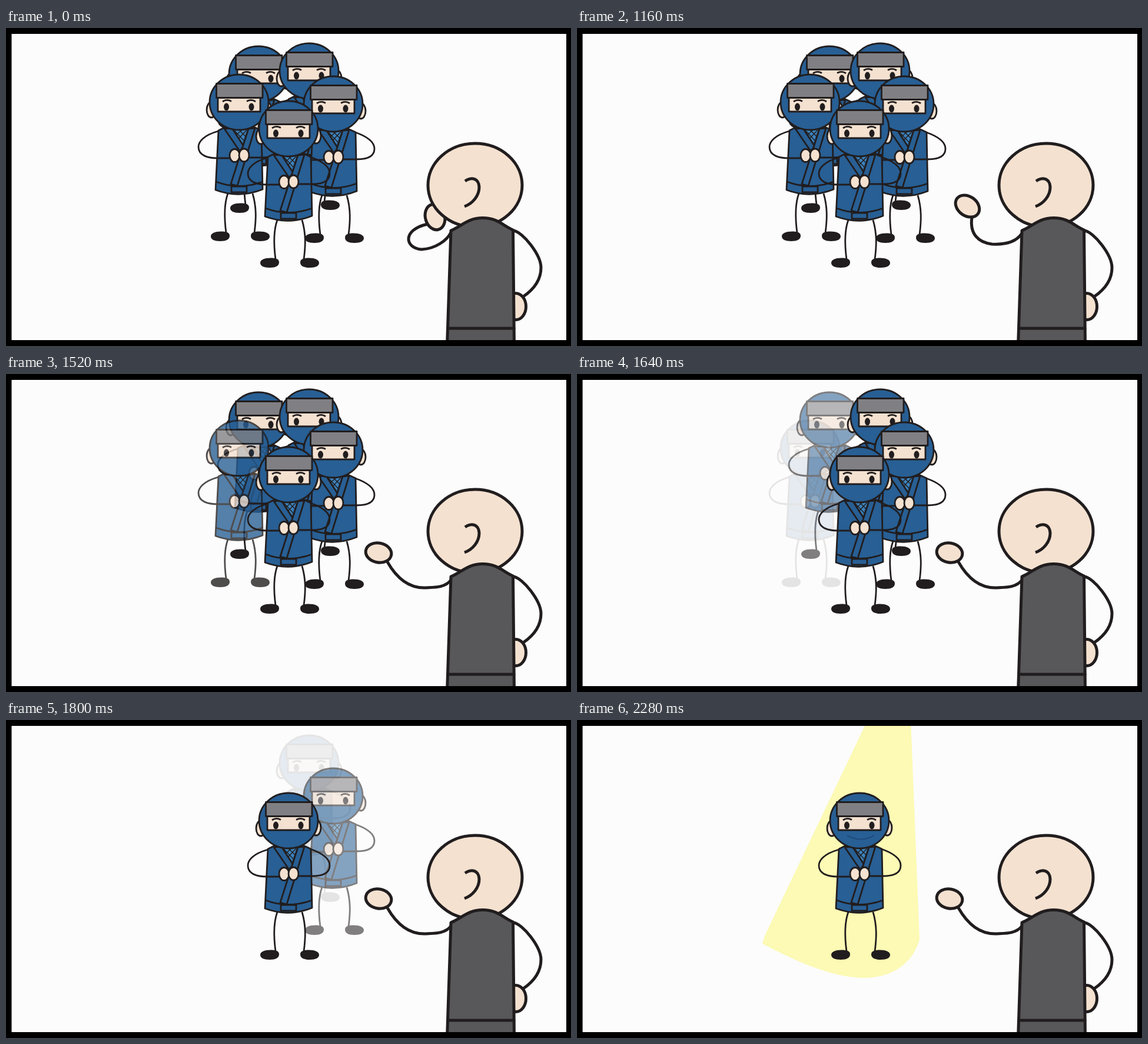
Animation of 960 by 540 pixels, one loop 3400 ms. Source, as an HTML page:

```html
<!DOCTYPE html>
<html lang="en">
<head>
<meta charset="utf-8">
<title>The chosen one</title>
<style>
  html, body { margin: 0; height: 100%; overflow: hidden; background: #fcfcfc; }
  svg { display: block; width: 100vw; height: 100vh; }
  .line { fill: none; }
  .skin { fill: #f4e1d0; }
  .cloth { fill: #285f94; }
  .grey { fill: #808084; }
  .ink { fill: #211d1e; stroke: none; }
  .suit { fill: #58585a; }
</style>
</head>
<body>
<svg viewBox="0 0 960 540">
  <defs>
    <g id="ninja" stroke="#211d1e" stroke-width="2.8" stroke-linejoin="round">
      <path class="line" d="M461 326C454 345 455 370 458 393M503 326C510 350 509 370 506 393"/>
      <path class="ink" d="M432 399C432 393 440 390 452 390.500C460 391 464 393 464 398C464 404 458 407 448 407C438 407 432 404 432 399Z
        M532 399C532 393 524 390 512 390.500C504 391 500 393 500 398C500 404 506 407 516 407C526 407 532 404 532 399Z"/>
      <path class="cloth" d="M445 219L457 213H505L518 219L520 319Q480 335 440 320Z"/>
      <path d="M470 215H495L484 243Z" fill="#3d83bd" stroke="none"/>
      <path class="line" stroke-width="1.500" d="M472 219L488 236M479 217L491 229M493 218L479 233M486 217L475 227"/>
      <path class="cloth" d="M455 216L481 254L488 246L468 215Z"/>
      <path class="cloth" d="M496 216L466 310L477 313L507 215Z"/>
      <path class="line" d="M441 306Q480 321 520 306"/>
      <path class="cloth" d="M467 314H493V324H467Z"/>
      <path class="line" d="M445 220C420 227 411 238 411 247C411 262 428 266 443 266H465M517 219C540 227 550 237 550 247C550 260 538 265 520 265H496"/>
      <ellipse class="skin" cx="472.500" cy="261.500" rx="8.500" ry="11"/>
      <ellipse class="skin" cx="488.500" cy="261" rx="8.500" ry="11"/>
      <ellipse class="skin" cx="433" cy="184" rx="8" ry="13"/>
      <ellipse class="skin" cx="527" cy="183" rx="8" ry="13"/>
      <ellipse class="cloth" cx="480" cy="171" rx="50" ry="47"/>
      <path class="skin" d="M444 163H516V187H444Z"/>
      <path class="grey" d="M441.500 139.500H520V163.500H441.500Z"/>
      <path class="line" d="M452 170Q459 165 467 169.500M493 169.500Q501 165 508 170"/>
      <ellipse class="ink" cx="458.500" cy="179" rx="4.500" ry="6.500"/>
      <ellipse class="ink" cx="501" cy="179" rx="4.500" ry="6.500"/>
    </g>
  </defs>

  <rect width="960" height="540" fill="#fcfcfc"/>
  <path id="spot" fill="#fcfab4" d="M489 10H567.500L582 372C575 402 546 438 487 438C430 437 370 408 315 380Q317 370 323 358Z"/>
  <g id="crowd"></g>
  <use href="#ninja"/>
  <path id="smile" class="line" stroke="#1f4c7d" stroke-width="2.200" d="M459 196Q482 209 505 196"/>

  <g stroke="#211d1e" stroke-width="5" stroke-linejoin="round" stroke-linecap="round">
    <path id="arm" class="line"/>
    <ellipse id="hand" class="skin" rx="22" ry="16.500"/>
    <ellipse class="skin" cx="797" cy="267" rx="80" ry="71"/>
    <path class="line" stroke-linecap="butt" d="M780 260C790 253 803 254 804 270C804 285 793 298 779 303"/>
    <path class="line" d="M862 344C878 346 909 385 909 407C909 430 895 445 879 456"/>
    <ellipse class="skin" cx="866" cy="473" rx="17.500" ry="22.500"/>
    <path class="suit" d="M756 344C775 336 785 322.500 810 322.500C835 322.500 845 336 861.500 343L863.500 540H749.500Z"/>
    <path class="line" d="M751 510H863"/>
  </g>
  <path fill-rule="evenodd" d="M0 0H960V540H0ZM9.500 10H952V530H9.500Z"/>
</svg>

<script>
const LOOP = 3400, STEP = 40;
const $ = id => document.getElementById(id);
const clamp = x => Math.min(1, Math.max(0, x));

// Back to front: offset from the middle ninja and the time its fade is first seen.
const crowd = [
  { x: -51, y: -93, fade: 1600 },
  { x: 35, y: -98, fade: 1680 },
  { x: -84, y: -45, fade: 1520 },
  { x: 76, y: -42, fade: 1760 }
];
for (const ninja of crowd) {
  ninja.node = document.createElementNS("http://www.w3.org/2000/svg", "use");
  ninja.node.setAttribute("href", "#ninja");
  ninja.node.setAttribute("transform", `translate(${ninja.x} ${ninja.y})`);
  $("crowd").append(ninja.node);
}

// Each pose: hand x, y and angle, then the arm from shoulder to wrist.
const MID = 0.74;
const thinking = [729, 321, 75, 756, 347, 750, 360, 730, 375, 706, 376, 678, 374, 672, 343, 716, 333];
const swinging = [663.5, 302.5, 36, 755, 350, 745, 364, 725, 368, 705, 367, 682, 364, 667, 350, 671, 322];
const pointing = [633, 303.5, 10, 756, 350, 745, 364, 725, 362, 710, 363, 685, 363, 664, 347, 648, 319];

// Quadratic through the three poses at 0, MID and 1.
function blend(p) {
  const a = (p - MID) * (p - 1) / MID;
  const b = p * (p - 1) / (MID * (MID - 1));
  const c = p * (p - MID) / (1 - MID);
  return thinking.map((v, i) => a * v + b * swinging[i] + c * pointing[i]);
}

function drawArm(t) {
  const u = clamp((t - 920) / 360);
  const [x, y, angle, sx, sy, ...curve] = blend(u * u * (3 - 2 * u));
  $("hand").setAttribute("transform", `translate(${x} ${y}) rotate(${angle})`);
  $("arm").setAttribute("d", `M${sx} ${sy}C${curve.join(" ")}`);
}

function draw(now) {
  const t = Math.floor(now % LOOP / STEP) * STEP;
  drawArm(t);
  for (const { node, fade } of crowd) {
    node.setAttribute("opacity", t < fade ? 1 : clamp(0.79 - 0.23 * (t - fade) / STEP));
  }
  const light = clamp((t - 1900) / 380);
  $("spot").setAttribute("opacity", light);
  $("smile").setAttribute("opacity", light);
}

const start = performance.now();
function tick() {
  draw(performance.now() - start);
  requestAnimationFrame(tick);
}
tick();
</script>
</body>
</html>
```
